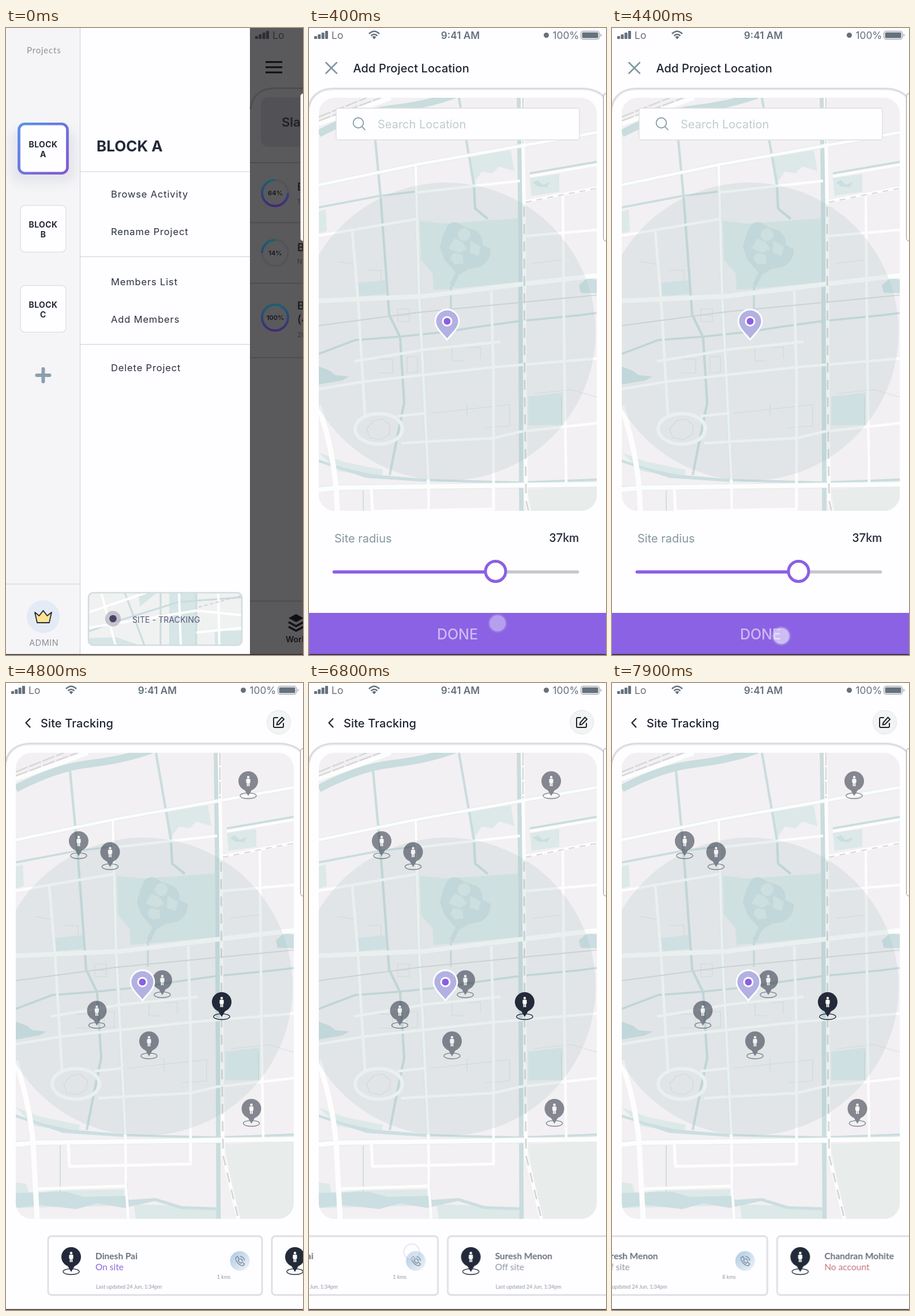
Animation, 515 px wide and 1087 px high, one loop 8000 ms. Source, as an HTML page:

```html
<!DOCTYPE html>
<html lang="en">
<head>
<meta charset="utf-8">
<title>Site tracking</title>
<style>
html,body{margin:0;width:100%;height:100%;overflow:hidden;background:#fefdff}
svg{display:block;width:100vw;height:100vh}
text{font-family:Inter,Roboto,sans-serif}
.soft{font-family:Lato,"Open Sans",sans-serif}
.mid{text-anchor:middle}
.title{font-size:20px;font-weight:500;letter-spacing:.1px;fill:#1f2433}
.block{font-weight:700;font-size:14px;letter-spacing:.4px;fill:#232a3a;text-anchor:middle}
.menu{font-size:16.5px;letter-spacing:.85px;fill:#2a3040}
.line{fill:none;stroke-linejoin:round}
.small{font-size:9px;fill:#8f9aa3}
</style>
</head>
<body>
<svg viewBox="0 0 515 1087" preserveAspectRatio="none">
<defs>
  <linearGradient id="edge" x1="0" y1="0" x2="1" y2="1"><stop stop-color="#5a92ea"/><stop offset="1" stop-color="#8457d2"/></linearGradient>
  <linearGradient id="arc" x1="1" y1="0" x2="0" y2="0"><stop stop-color="#1c5f74"/><stop offset="1" stop-color="#3f2a78"/></linearGradient>
  <linearGradient id="call" x1="0" y1="0" x2="1" y2="1"><stop stop-color="#adc9e2"/><stop offset="1" stop-color="#f1f5fa"/></linearGradient>
  <filter id="blur" x="-50%" y="-50%" width="200%" height="200%"><feGaussianBlur stdDeviation="9"/></filter>
  <filter id="haze"><feGaussianBlur stdDeviation="1.2"/></filter>
  <clipPath id="short"><rect x="17" y="121" width="482" height="716" rx="27"/></clipPath>
  <clipPath id="tall"><rect x="17" y="121" width="482" height="808" rx="27"/></clipPath>
  <clipPath id="tile"><rect x="143" y="979" width="266" height="91" rx="8"/></clipPath>

  <g id="signal" fill="currentColor">
    <rect x="9" y="14" width="5" height="5" rx="1"/><rect x="15.3" y="11" width="5" height="8" rx="1"/>
    <rect x="21.7" y="8" width="5" height="11" rx="1"/><rect x="28" y="5" width="5" height="14" rx="1"/>
    <text x="39" y="19" font-size="17.5">Lo</text>
  </g>

  <g id="status" color="#65717d">
    <use href="#signal"/>
    <g class="line" stroke="currentColor" stroke-width="2.6">
      <path d="M104 10Q113 1.500 122 10M107.500 13.500Q113 8.500 118.500 13.500"/>
    </g>
    <path d="M109.500 15.500Q113 12.500 116.500 15.500L113 19.500Z" fill="currentColor"/>
    <text x="262.500" y="18.500" class="mid" font-size="17.200" font-weight="600" fill="currentColor">9:41 AM</text>
    <circle cx="411.500" cy="12.500" r="4.500" fill="currentColor"/>
    <text x="422.500" y="18.500" font-size="17.300" fill="currentColor">100%</text>
    <rect x="471.500" y="5.500" width="32" height="14" rx="3.500" fill="none" stroke="#8d969e"/>
    <rect x="473.500" y="7.500" width="28" height="10" rx="1.500" fill="currentColor"/>
    <path d="M505.500 9.500q3 3 0 6Z" fill="#8d969e"/>
  </g>

  <g id="rim" class="line">
    <path d="M-2 146C0 118 18 106 42 105.500H474C498 106 514 116 518 132" stroke="#d6d4da" stroke-width="2.600" filter="url(#haze)"/>
    <path d="M0 137C4 115 20 105 42 104.500H474C494 105 508 113 514 124" stroke="#d3d1d6" stroke-width="1.200"/>
  </g>

  <g id="map">
    <rect x="17" y="121" width="482" height="808" fill="#f2f0f2"/>
    <g fill="#dce9e8">
      <path d="M276 223L350 212L356 248L330 240L318 252L300 249L283 272Z"/>
      <path d="M383 260L434 253V284L386 291ZM17 318L29 315L31 352L17 356Z"/>
      <path d="M17 866L35 868L40 886L80 880L205 878V906L17 910Z"/>
      <path d="M222 904L300 906L365 914V929H225ZM17 736L60 752L128 766L126 780L50 768Z"/>
    </g>
    <path d="M379 800L499 794V929H404Z" fill="#e8ecea"/>
    <path d="M192 334L235 339L362 330V441L246 452L216 454L214 425L194 402Z" fill="#dceaeb"/>
    <g fill="#dceaec">
      <path d="M380 639L440 632L438 688L380 689ZM85 442L133 437L134 461L86 465Z"/>
    </g>
    <g fill="#cbdee1">
      <path d="M240 343Q252 330 268 344L291 352Q302 361 301 376L315 383Q316 404 297 414L276 418L260 428L250 449L244 444L254 424L235 402L227 380L232 360Z"/>
      <path d="M17 587L36 594L46 602L70 604L58 611L17 618ZM468 446L482 434L499 436V460L471 459Z"/>
      <path d="M388 268L397 264L405 272L418 267L413 276L398 275Z"/>
      <path d="M17 748L58 762L110 774L205 782V787L100 780L17 753Z"/>
      <path d="M17 884L104 882L136 891L205 889L214 896L260 893L305 907L366 909V914L304 912L258 898L205 910L158 902L122 912L60 905L17 910Z"/>
    </g>
    <g fill="#dae8ea"><circle cx="269" cy="358" r="11"/><path d="M252 365l14 6l8 12l-14 7l-18-8ZM280 369l18 10l-4 16l-15-5ZM250 390l16 3l2 15l-15 2l-8-10Z"/></g>
    <g class="line" stroke="#c9dcde">
      <path d="M17 183Q85 147 145 140T252 116" stroke-width="13"/>
      <path d="M111 152L124 291L139 497L158 536L165 650L150 724L140 775" stroke-width="4.200"/>
      <path d="M260 121L275 208L286 270L288 313L310 331" stroke-width="4.200"/>
      <path d="M246 447V492" stroke-width="3"/>
      <path d="M17 311L123 291L190 283M383 252L499 232" stroke-width="3.600"/>
      <path d="M17 565L80 541L120 538L158 535L235 527L300 517L366 508L468 498L499 494" stroke-width="3.600"/>
      <path d="M205 784L366 788L499 783" stroke-width="4"/>
      <path d="M364 121L366 300L368.500 929" stroke-width="7.500"/>
      <path d="M49 780L56 929M94 796V886M206 796L213 929M438 640V688" stroke-width="1.600"/>
    </g>
    <g class="line" stroke="#dee1df" stroke-width="1.200">
      <path d="M154 487h20v22h-20ZM154 498h20M120 574h25v24h-25M170 570h18v27h-18ZM248 555v22h20M275 555l22-2v20"/>
      <path d="M210 668L348 653V690L305 693M274 650v24M390 634L455 627L499 640M50 405L80 410M388 408L438 402M100 420h25v20"/>
      <path d="M112 681L128 678L141 689L139 705L124 714L105 710L100 695Z"/>
    </g>
    <g class="line" stroke="#e2ebeb">
      <path d="M17 272L185 237L370 204L499 181" stroke-width="7"/>
      <path d="M185 237L191 466L198 600L207 795" stroke-width="6"/>
      <path d="M17 799L52 797L499 791" stroke-width="10"/>
    </g>
    <g class="line" stroke="#fdfdfd">
      <path d="M17 272L185 237L370 204L499 181" stroke-width="5"/>
      <path d="M185 237L191 466L198 600L207 785L208 872L212 929" stroke-width="4.500"/>
      <path d="M188 285L366 265M383 257L499 237M17 360L188 331M372 361L499 350" stroke-width="4.500"/>
      <path d="M17 473L200 465L370 444L499 429" stroke-width="8"/>
      <path d="M75 352L85 470L97 672M316 456L320 600V795M440 290L443 600L446 788" stroke-width="4.500"/>
      <path d="M17 626L95 613L320 588L499 573M78 578L205 557L332 544" stroke-width="4.500"/>
      <path d="M153 673L200 668M160 720L205 717L320 711L366 700L499 685" stroke-width="4.500"/>
      <path d="M17 655L27 690Q42 742 47 797L54 929" stroke-width="9"/>
      <path d="M17 800L52 797L499 791" stroke-width="8"/>
      <path d="M108 797L110 838L320 834V797M54 877L208 872" stroke-width="5"/>
      <path d="M370 121L373 310L374.500 640L376.500 820L403 929" stroke-width="6"/>
      <path d="M373 301L499 277" stroke-width="5"/>
      <ellipse cx="121" cy="695" rx="41" ry="26.500" stroke-width="6"/>
      <path d="M17 166L142 121" stroke-width="8"/>
    </g>
    <g class="line" stroke="#d6d7d7">
      <path d="M17 154L100 121M17 161L124 121M365 121V146M371 121V200" stroke-width="2.500" stroke-dasharray="22 3"/>
      <path d="M373 310L374 640L376.500 820L403 929" stroke-width="3" stroke-dasharray="17 13"/>
      <path d="M376 302L440 289L499 278" stroke-width="2" stroke-dasharray="10 9"/>
      <path d="M17 516L190 493L499 463" stroke="#d3dad7" stroke-width="2"/>
    </g>
    <circle cx="238.500" cy="526.500" r="258.500" fill="#9db9bb" fill-opacity=".2"/>
  </g>

  <g id="pin">
    <path d="M0 32C-6 23 -20.500 13 -20.500 0A20.500 20.500 0 0 1 20.500 0C20.500 13 6 23 0 32Z" fill="#b2b1e2" stroke="#fff" stroke-width="2.800" stroke-linejoin="round"/>
    <circle r="9" fill="#fff"/><circle r="6" fill="#8a5fe0"/>
  </g>

  <g id="person">
    <ellipse cy="25.500" rx="14" ry="5" fill="none" stroke="#232a3a" stroke-width="1.400"/>
    <path d="M-7 14L0 26L7 14Z" fill="#232a3a"/>
    <circle r="17" fill="#232a3a"/>
    <g fill="#fff"><circle cy="-6.800" r="2.200"/><path d="M-3.600-2.500Q-3.600-4 -2.200-4H2.200Q3.600-4 3.600-2.500V3H2.400V9H.4V4H-.4V9H-2.400V3H-3.600Z"/></g>
  </g>

  <g id="phone">
    <circle r="17" fill="url(#call)"/>
    <g class="line" stroke="#7b8c9c" stroke-width="1.500" stroke-linecap="round">
      <path d="M-7-6L-4-8L-1-3L-3-1Q-1 3 2 4L4 2L8 5L6 8Q2 9 -3 4T-7-6ZM1-4Q4-3 4.500 0M1-8Q7-7 8-1"/>
    </g>
  </g>
</defs>

<g id="drawer">
  <rect width="515" height="1087" fill="#fefdff"/>
  <rect width="128" height="1087" fill="#f5f5f7"/>
  <rect x="8" y="176" width="112" height="92" rx="16" fill="#d5d8e2" opacity=".55" filter="url(#blur)"/>
  <rect x="128.500" width="295" height="1087" fill="#fefdff"/>
  <path d="M128.500 0V1087" stroke="#c9d2d7"/>
  <text x="65.800" y="44" class="soft mid" font-size="15" letter-spacing=".8" fill="#8d9196">Projects</text>
  <g id="blocks"></g>
  <path d="M64.500 591V613M53.500 602H75.500" stroke="#8ba0af" stroke-width="6" stroke-linecap="round"/>
  <path d="M0 964H128M129 249H423M129 396.500H423M129 548.500H423" stroke="#c5d2d8" stroke-width="1.200"/>
  <circle cx="64.500" cy="1020.500" r="28.500" fill="#e4eaf6"/>
  <path d="M50 1013L54 1031H75L79 1013L71.500 1019L64.500 1010L57.500 1019Z" fill="#ffe291" stroke="#232a3a" stroke-width="1.800" stroke-linejoin="round"/>
  <text x="65.700" y="1071" class="mid" font-size="14.500" letter-spacing=".5" fill="#8b9197">ADMIN</text>
  <text x="157" y="214" font-size="26" font-weight="700" fill="#232a3a">BLOCK A</text>
  <g id="menu"></g>

  <g clip-path="url(#tile)">
    <rect x="143" y="979" width="266" height="91" fill="#f0f1f1"/>
    <path d="M283 979H330V1070H283ZM143 1058L190 1056L232 1070H143ZM230 979H262L232 1003ZM362 1045H409V1070H362Z" fill="#d6e5e6"/>
    <path d="M143 1046L200 1026L300 995L409 987M206 979L240 1070M330 979V1070M268 979V1070" class="line" stroke="#c9dcde" stroke-width="3"/>
    <path d="M143 1013L243 979M143 1040L330 1010L409 1018M165 979L190 1070M300 979L303 1070M368 979L370 1070M330 1048L409 1040" class="line" stroke="#fff" stroke-width="4"/>
    <path d="M334 1004L409 984" stroke="#d2d2d5" stroke-width="2" stroke-dasharray="6 4"/>
  </g>
  <rect x="143" y="979" width="266" height="91" rx="8" fill="none" stroke="#d3dcdf" stroke-width="2.500"/>
  <circle cx="185.500" cy="1024" r="13.500" fill="#aaa7b7" opacity=".65"/>
  <circle cx="185.500" cy="1024" r="6.300" fill="#4a4369"/>
  <text x="219" y="1031" font-size="14" letter-spacing=".1" fill="#565a78">SITE - TRACKING</text>

  <rect x="423" width="92" height="1087" fill="#5a595c"/>
  <g color="#2b2e33"><use href="#signal" x="423"/></g>
  <path d="M424 140C427 116 443 105 465 104.500H515" class="line" stroke="#4d4c4f" stroke-width="3"/>
  <path d="M450 59H479M450 68H479M450 77H479" stroke="#0d0e12" stroke-width="3"/>
  <rect x="442" y="120" width="90" height="86" rx="13" fill="#525155"/>
  <text x="478" y="171" font-size="22" font-weight="600" fill="#202127">Sla</text>
  <path d="M423 233.500H515M423 337.500H515M423 442.500H515M423 571.500H515M423 993.500H515" stroke="#48484b" stroke-width="1.300"/>
  <g id="rings"></g>
  <g font-weight="600" font-size="19" fill="#1d1e24">
    <text x="505" y="282">B</text><text x="505" y="387">B</text><text x="505" y="488">B</text><text x="505" y="512">(4</text>
  </g>
  <g font-size="12" fill="#36373c"><text x="505" y="305">1</text><text x="505" y="409">N</text><text x="505" y="536">20</text></g>
  <path d="M490 1023L503 1016L516 1023L503 1030Z" fill="#0f1015"/>
  <path d="M490 1030L503 1037L516 1030M490 1038L503 1045L516 1038" class="line" stroke="#0f1015" stroke-width="3.500"/>
  <text x="485" y="1065" font-size="14" font-weight="600" fill="#15161b">Work</text>
</g>

<g id="place">
  <rect width="515" height="1087" fill="#fefdff"/>
  <use href="#status"/><use href="#rim"/>
  <path d="M29.500 60L48 78.500M48 60L29.500 78.500" stroke="#7d979e" stroke-width="2.500" stroke-linecap="round"/>
  <text x="76.500" y="76.500" class="title">Add Project Location</text>
  <g clip-path="url(#short)"><use href="#map"/></g>
  <use href="#pin" x="239.500" y="508.500"/>
  <rect x="47" y="139" width="422" height="55" rx="4" fill="#fefdff" stroke="#dddee1" stroke-width="1.400"/>
  <g class="line" stroke="#7d979e" stroke-width="1.700"><circle cx="85.500" cy="164.500" r="8.800"/><path d="M92 171L97.500 177"/></g>
  <text x="119" y="174" font-size="20" fill="#c0cdce">Search Location</text>
  <text x="44" y="892" font-size="20" fill="#82989e">Site radius</text>
  <text x="468" y="890.500" text-anchor="end" class="soft" font-size="20.500" font-weight="600" fill="#232a3a">37km</text>
  <g stroke-width="5.500" stroke-linecap="round"><path d="M323 943H465.500" stroke="#c7c8ca"/><path d="M43.500 943H323" stroke="#8b5fe3"/></g>
  <circle cx="323.500" cy="942" r="17.500" fill="#fff" stroke="#8b5fe3" stroke-width="5"/>
  <rect y="1014" width="515" height="73" fill="#8b62e3"/>
  <text x="257.500" y="1059.500" class="mid" font-size="25" font-weight="500" fill="#cdb9f2">DONE</text>
</g>

<g id="track">
  <rect width="515" height="1087" fill="#fefdff"/>
  <use href="#status"/><use href="#rim"/>
  <path d="M41.500 62L34.500 69L41.500 76.500" class="line" stroke="#20242f" stroke-width="2.200" stroke-linecap="round"/>
  <text x="60" y="76.500" class="title">Site Tracking</text>
  <circle cx="473" cy="68" r="20.500" fill="#f2f4f4" stroke="#e2e5e7"/>
  <g class="line" stroke="#20242f" stroke-width="2" stroke-linecap="round">
    <path d="M471 60H466Q464 60 464 62V75Q464 77 466 77H479Q481 77 481 75V70M478.500 59.500L482 63L473.500 71.500L469.500 72.500L470.500 68.500Z"/>
  </g>
  <g clip-path="url(#tall)"><use href="#map"/></g>
  <g id="people"></g>
  <use href="#pin" x="236.500" y="518.500"/>
  <g id="cards"></g>
</g>

<rect x="510.500" y="113.500" width="14" height="256" rx="5" fill="#fefdff" stroke="#8f8f96"/>
<rect y="1085.500" width="515" height="1.500" fill="#2c2b30"/>
<g id="touch" opacity="0">
  <circle r="17" fill="#fff" opacity=".13"/>
  <circle r="13.500" fill="#fff" fill-opacity=".52" stroke="#c3bfee" stroke-opacity=".75" stroke-width="2"/>
</g>
</svg>

<script>
const $ = id => document.getElementById(id);
const fill = (id, list, draw) => { $(id).innerHTML = list.map(draw).join(''); };

fill('blocks', [['A', 168], ['B', 307], ['C', 446]], ([name, y], i) => `
  ${i ? '' : '<rect x="22.5" y="166.500" width="84" height="85" rx="10" fill="#fff" stroke="url(#edge)" stroke-width="4.800"/>'}
  <rect x="25" y="${y + .5}" width="79" height="81" rx="8" fill="#fefdff" stroke="${i ? '#dfe1e6' : 'none'}" stroke-width="1.400"/>
  <text x="64.500" y="${y + 39}" class="block">BLOCK</text><text x="64.500" y="${y + 56}" class="block">${name}</text>`);

fill('menu', [['Browse Activity', 294], ['Rename Project', 358.5], ['Members List', 446], ['Add Members', 510.5], ['Delete Project', 595]],
  ([label, y]) => `<text x="182" y="${y}" class="menu">${label}</text>`);

fill('rings', [['64%', 286, .75], ['14%', 390, .25], ['100%', 502, 1]], ([label, y, part]) => `
  <circle cx="466.500" cy="${y}" r="22.500" fill="none" stroke="#545357" stroke-width="3.500"/>
  <g transform="translate(466.500 ${y}) scale(-1 1)"><circle r="22.500" fill="none" stroke="url(#arc)" stroke-width="4"
    pathLength="1" stroke-dasharray="${part} 1" transform="rotate(-90)"/></g>
  <text x="467" y="${y + 4}" class="mid" font-size="11" font-weight="700" fill="#1c1d23">${label}</text>`);

fill('people', [[420, 170], [126, 274], [180.5, 293], [271, 515], [157.5, 568], [248, 621], [425.5, 738], [374, 553, 1]],
  ([x, y, on]) => `<use href="#person" x="${x}" y="${y}" opacity="${on || .53}"/>`);

const PITCH = 388;
const cards = [
  ['Dinesh Pai', 'On site', '#8d68df', '1 kms'],
  ['Suresh Menon', 'Off site', '#929aa5', '8 kms'],
  ['Chandran Mohite', 'No account', '#c2757c', '']
];
fill('cards', cards, ([name, state, tint, far], i) => `
  <g transform="translate(${72 + i * PITCH} 958)">
    <rect x="1" y="1" width="371" height="102" rx="6" fill="#fefdff" stroke="#dfdee3" stroke-width="2.800"/>
    <use href="#person" x="41" y="37"/>
    <text x="83" y="41" class="soft" font-size="15.500" font-weight="700" fill="#69727d">${name}</text>
    <text x="83" y="60" class="soft" font-size="15.500" fill="${tint}">${state}</text>
    ${far && `<text x="84" y="92" class="soft small">Last updated 24 Jun, 1:34pm</text>
    <text x="305.500" y="75" class="soft small mid">${far}</text><use href="#phone" x="333.500" y="44"/>`}
  </g>`);

const LOOP = 8000, STEP = 100;
const ramp = (t, a, b) => Math.min(1, Math.max(0, (t - a) / (b - a)));
const smooth = (t, a, b) => { const p = ramp(t, a, b); return p * p * (3 - 2 * p); };

// Samples a motion rule at ten pictures per second.
function play(id, rule) {
  const frames = [];
  for (let t = 0; t <= LOOP; t += STEP)
    frames.push({ offset: t / LOOP, easing: 'step-end', ...rule(Math.min(t, LOOP - STEP)) });
  $(id).animate(frames, { duration: LOOP, iterations: Infinity });
}

// start, fade start, end, from x, y, to x, y, move end
const touches = [
  [100, 300, 600, 327, 1032, 327, 1032, 600],
  [4400, 4500, 4800, 293.5, 1054, 293.5, 1054, 4800],
  [6300, 6600, 7000, 368.5, 1003, 178, 986, 6800],
  [7300, 7600, 7800, 368.5, 1003, 215, 992, 7700]
];

play('place', t => ({ opacity: smooth(t, 100, 400) }));
play('track', t => ({ opacity: smooth(t, 4450, 4800) }));
play('cards', t => ({
  transform: `translateX(${-PITCH * (smooth(t, 6440, 7100) + smooth(t, 7500, 8357))}px)`
}));
play('touch', t => {
  const hit = touches.find(([a, , b]) => t >= a && t < b);
  if (!hit) return { opacity: 0, transform: 'translate(0px,0px)' };
  const [a, fade, b, x, y, x2, y2, stop] = hit, k = smooth(t, a, stop);
  return { opacity: 1 - ramp(t, fade, b), transform: `translate(${x + (x2 - x) * k}px,${y + (y2 - y) * k}px)` };
});
</script>
</body>
</html>
```
